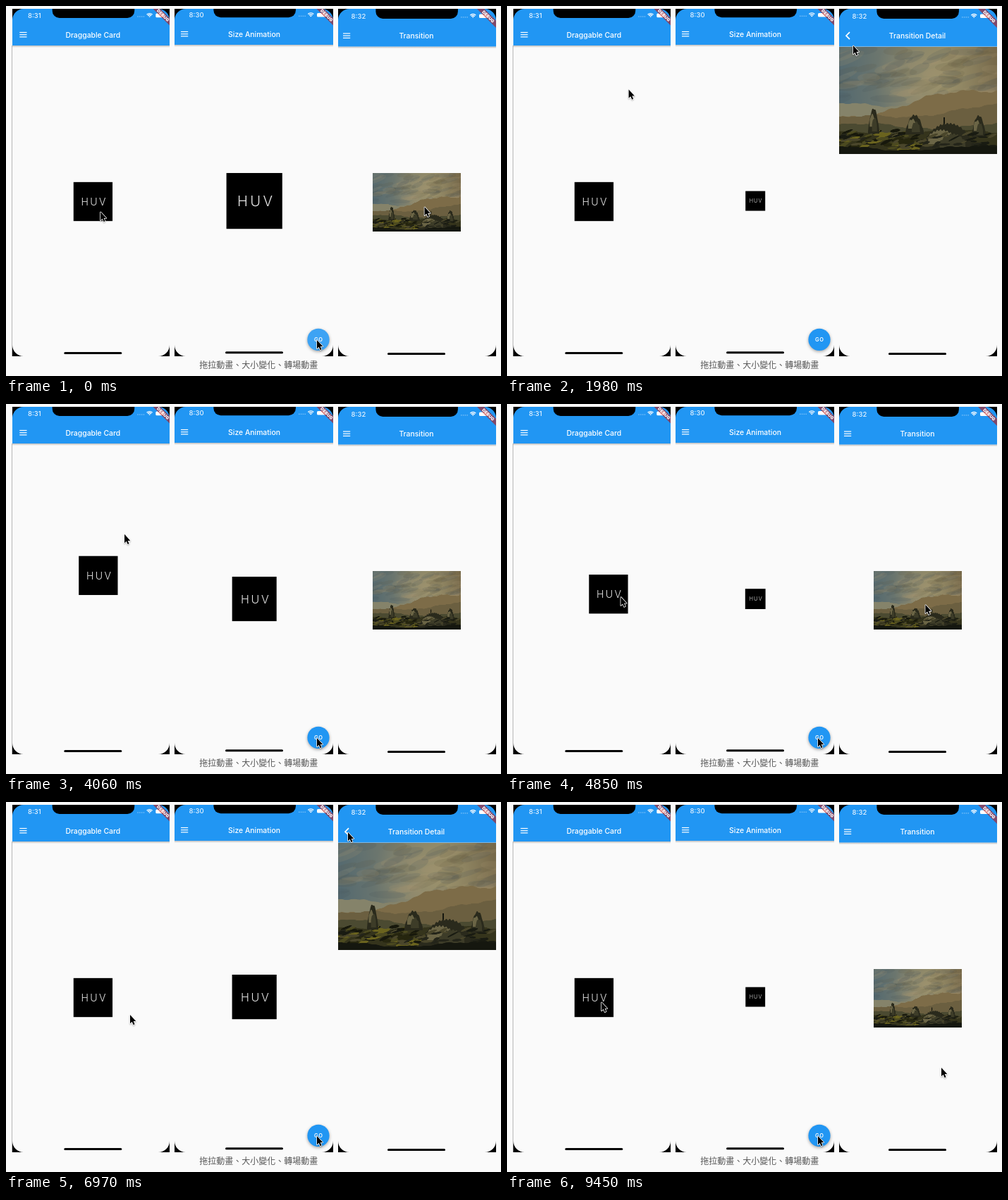
An HTML page with a canvas for the animation above (9550 ms loop, 702 by 525 pixels).

```html
<!DOCTYPE html>
<html lang="zh-Hant">
<head>
<meta charset="utf-8">
<style>
html, body { margin: 0; overflow: hidden; background: #fafafa; }
canvas { display: block; }
</style>
</head>
<body>
<canvas id="stage" width="702" height="525"></canvas>
<script>
const LOOP = 9550, TOP = 4, BOTTOM = 497;
const GLIDE = 560, HOLD = 60, RETURN = 450, ROUTE = 400;
const BLUE = '#2196f3', PAPER = '#fafafa', SANS = 'Inter, Roboto, sans-serif';
const painting = paintLandscape();
const ctx = document.getElementById('stage').getContext('2d');

const phones = [
  { left: 9, right: 232, cx: 123.3, dy: 0, bar: 56, time: '8:31', banner: 13, screen: dragScreen },
  { left: 239, right: 464, cx: 352, dy: -.7, bar: 55, time: '8:30', banner: 13, screen: sizeScreen },
  { left: 471, right: 695, cx: 582, dy: .9, bar: 57.5, time: '8:32', banner: 15.5, screen: heroScreen }
];

const drags = [
  { at: 550, grab: [134, 292], pull: [61, -182] },
  { at: 3190, grab: [145, 292], pull: [24, -110] },
  { at: 4565, grab: [134, 284], pull: [53, -20] },
  { at: 7600, grab: [134, 284], pull: [50, 90] }
];
const button = [441, 474], picture = [593.5, 285], backArrow = [485, 43];
const taps = [-140, 450, 2838, 4250, 6000, 7200, 8000, 8450];
const routes = [350, 2470, 5380, 7100];

// Each move is [start time, [x, y]]
const dragMoves = [
  ...drags.flatMap(({ at, grab, pull }) => [[at - GLIDE, grab], [at, [grab[0] + pull[0], grab[1] + pull[1]]]]),
  [1900, [-200, 260]], [5700, [176, 302]], [8750, [134, 284]]
].sort((a, b) => a[0] - b[0]);
const sizeMoves = [[0, button], [600, [480, 500]], [2000, button]];
const heroMoves = [[0, picture], [1500, backArrow], [2950, [430, 60]], [4300, picture], [6000, backArrow], [8000, [616, 377]]];

function mix(a, b, k) { return a + (b - a) * k; }
function clamp(v) { return Math.max(0, Math.min(1, v)); }
function smooth(v) { const u = clamp(v); return u * u * (3 - 2 * u); }

function pointerAt(moves, t) {
  const i = Math.max(0, moves.filter(m => m[0] <= t).length - 1);
  const from = moves[Math.max(0, i - 1)][1], [start, to] = moves[i];
  const k = smooth((t - start) / GLIDE);
  return [mix(from[0], to[0], k), mix(from[1], to[1], k)];
}

function paintLandscape() {
  const canvas = document.createElement('canvas');
  canvas.width = 448;
  canvas.height = 304;
  const g = canvas.getContext('2d');
  g.scale(2, 2);
  let seed = 7;
  const random = (a, b) => mix(a, b, (seed = seed * 16807 % 2147483647) / 2147483647);

  const fade = (gradient, ...colors) => {
    colors.forEach((c, i) => gradient.addColorStop(i / (colors.length - 1), c));
    g.fillStyle = gradient;
    g.fillRect(0, 0, 224, 152);
  };
  const silhouette = (color, from, to, top, base) => {
    g.fillStyle = color;
    g.beginPath();
    g.moveTo(from, base);
    for (let x = from; x <= to; x++) g.lineTo(x, top(x));
    g.lineTo(to, base);
    g.fill();
  };
  const ridge = (color, y, slope, height, phase) => silhouette(color, 0, 224, x =>
    y + slope * x - height * (Math.sin(x / 31 + phase) + .3 * Math.sin(x / 9 + phase * 2) + .12 * Math.sin(x / 2.7)), 152);
  const dapple = (count, colors, top, bottom, size, right = 224) => {
    for (let i = 0; i < count; i++) {
      g.fillStyle = colors[i % colors.length];
      g.beginPath();
      g.ellipse(random(0, right), random(top, bottom), random(size / 2, size), random(size / 8, size / 4), random(-.5, .1), 0, 7);
      g.fill();
    }
  };
  const rock = (x, base, half, height) => {
    const dome = (shift, scale) => v => base - height * scale * Math.max(0, 1 - Math.abs((v - x - shift) / half / scale) ** 2.2)
      + 1.2 * Math.sin(v * 1.3);
    silhouette('#2a2a1c', x - half, x + half, dome(0, 1), base + 3);
    silhouette('#6b6546', x - half * .7, x + half * .2, dome(-half * .25, .75), base - height * .2);
    silhouette('#3d3c28', x - half * .3, x + half * .6, dome(half * .15, .6), base);
  };

  fade(g.createLinearGradient(0, 30, 224, 10), '#556a70', '#737a6e', '#8b8564', '#77694a');
  fade(g.createRadialGradient(135, 48, 5, 135, 48, 85), 'rgba(165,152,112,.65)', 'rgba(165,152,112,0)');
  dapple(90, ['rgba(70,85,88,.16)', 'rgba(165,150,110,.16)', 'rgba(90,80,55,.13)'], 0, 75, 26);
  ridge('#85836a', 83, -.03, 4, 2);
  ridge('#7d6c48', 100, -.19, 6, 3.2);
  ridge('#6b5f40', 104, -.08, 4, 1);
  ridge('#4b4a31', 113, 0, 4, .4);
  ridge('#35341c', 121, 0, 3, 2.5);
  dapple(70, ['#6b641f', '#26260f', '#4c4a20', '#17180c'], 119, 145, 11, 130);
  rock(49, 120, 8, 32);
  rock(107, 121, 13, 24);
  rock(198, 125, 10, 27);
  rock(155, 146, 41, 37);
  dapple(45, ['#24251a', '#4a462b', '#191b12'], 123, 144, 9);
  ridge('#15170f', 144, 0, 3, 1.7);
  g.fillRect(148, 100, 2, 9);
  return canvas;
}

function rect(x, y, w, h, color) {
  ctx.fillStyle = color;
  ctx.fillRect(x, y, w, h);
}

function pill(x, y, w, h, radius, color) {
  ctx.fillStyle = color;
  ctx.beginPath();
  ctx.roundRect(x, y, w, h, radius);
  ctx.fill();
}

function circle(x, y, r, color) {
  ctx.fillStyle = color;
  ctx.beginPath();
  ctx.arc(x, y, r, 0, 7);
  ctx.fill();
}

function line(width, ...points) {
  ctx.lineWidth = width;
  ctx.strokeStyle = '#fff';
  ctx.beginPath();
  for (let i = 0; i < points.length; i += 2) ctx.lineTo(points[i], points[i + 1]);
  ctx.stroke();
}

function text(str, x, y, font, color = '#fff', align = 'center', spacing = 0) {
  ctx.font = font;
  ctx.fillStyle = color;
  ctx.textAlign = align;
  ctx.letterSpacing = spacing + 'px';
  ctx.fillText(str, x + (align === 'center' ? spacing / 2 : 0), y);
}

function linear(x0, y0, x1, y1, from, to) {
  const g = ctx.createLinearGradient(x0, y0, x1, y1);
  g.addColorStop(0, from);
  g.addColorStop(1, to);
  return g;
}

function shadow(blur, y, color) {
  ctx.shadowBlur = blur;
  ctx.shadowOffsetY = y;
  ctx.shadowColor = color;
}

function cursor([x, y]) {
  ctx.save();
  ctx.translate(x, y);
  ctx.scale(.9, .95);
  ctx.lineJoin = 'round';
  shadow(2, 1, 'rgba(0,0,0,.3)');
  line(1.7, 0, 0, 0, 13, 3, 10.3, 5.2, 15, 7.3, 14, 5.2, 9.5, 9.2, 9.5, 0, 0);
  shadow(0, 0, 'transparent');
  ctx.fillStyle = '#000';
  ctx.fill();
  ctx.restore();
}

function card(cx, cy, size) {
  rect(cx - size / 2, cy - size / 2, size, size, '#000');
  text('HUV', cx + size * .01, cy + size * .095, `300 ${size * .255}px ${SANS}`, '#e4e4e4', 'center', size * .042);
}

function page(p, title, offset = 0, detail = false) {
  const width = p.right - p.left, y = p.bar - 15.3;
  ctx.save();
  ctx.translate(offset, 0);
  if (detail && offset > 0) rect(p.left - 7, TOP, 7, 500, linear(p.left - 7, 0, p.left, 0, 'rgba(0,0,0,.04)', 'rgba(0,0,0,.2)'));
  rect(p.left, TOP, width, BOTTOM - TOP, PAPER);
  rect(p.left, p.bar, width, 3, linear(0, p.bar, 0, p.bar + 3, 'rgba(0,0,0,.25)', 'rgba(0,0,0,0)'));
  rect(p.left, TOP, width, p.bar - TOP, BLUE);
  text(title, p.cx, y + 3.8, `500 10.4px ${SANS}`);
  if (detail) line(1.7, p.cx - 96, y - 5, p.cx - 101, y, p.cx - 96, y + 5);
  else for (const d of [-3.2, 0, 3.2]) line(1.2, p.cx - 104, y + d, p.cx - 93.8, y + d);
  ctx.restore();
}

function dragScreen(p, t) {
  page(p, 'Draggable Card');
  let x = 123.4, y = 277.5;
  for (const { at, pull } of drags) {
    const age = t - at;
    const k = .75 * smooth(age / GLIDE) * (1 - smooth((age - GLIDE - HOLD) / RETURN));
    x += pull[0] * k;
    y += pull[1] * k;
  }
  card(x, y, 55.3);
  return dragMoves;
}

function sizeScreen(p, t) {
  page(p, 'Size Animation');
  const i = taps.filter(tap => tap <= t).length - 1;
  const [from, to] = i % 2 ? [63, 28] : [28, 63];
  const u = (t - taps[i]) / 700;
  card(352.2, 276.6, mix(from, to, 1 - 2 ** (-5.5 * u) * Math.cos(u * Math.PI * 5)));

  ctx.save();
  shadow(4, 1.5, 'rgba(0,0,0,.35)');
  circle(443, 473.4, 15.6, BLUE);
  ctx.restore();
  for (const tap of taps) {
    const age = t - tap + 90;
    if (age >= 0 && age < 500) circle(443, 473.4, mix(8, 15.6, clamp(age / 210)), `rgba(255,255,255,${.24 * (1 - age / 500)})`);
  }
  text('GO', 443, 476, `600 7.4px ${SANS}`, '#fff', 'center', .7);
  return sizeMoves;
}

function heroScreen(p, t) {
  const count = routes.filter(r => r <= t).length;
  const u = count ? clamp((t - routes[count - 1]) / ROUTE) : 1;
  const toward = k => count % 2 ? k : 1 - k;
  const slide = toward(1 - (1 - u) ** 3), rise = toward(u * (3 - 2 * Math.sqrt(u)));
  const spread = 1 - (1 - rise) ** 2;
  const width = p.right - p.left;

  page(p, 'Transition', -slide * width / 3);
  if (slide > 0) page(p, 'Transition Detail', (1 - slide) * width, true);
  ctx.drawImage(painting, mix(519.5, p.left, spread), mix(236.7, p.bar, rise), mix(125.3, width, spread), mix(83.3, 152.3, spread));
  return heroMoves;
}

function statusBar({ cx, dy, time }) {
  const y = 13.2 + dy;
  pill(cx - 57.6, 0, 116.5, 17 + dy, [0, 0, 10, 10], '#000');
  text(time, cx - 92.4, y + 3.5, `500 9.5px ${SANS}`, '#e6f3fe', 'left');
  for (let i = 0; i < 4; i++) rect(cx + 63 + i * 2.8, y + 1.2, 1.5, 1.2, 'rgba(255,255,255,.45)');
  ctx.lineWidth = 1.4;
  ctx.strokeStyle = '#fff';
  for (const r of [1.2, 3.4, 5.6]) {
    ctx.beginPath();
    ctx.arc(cx + 80.3, y + 3, r, -2.36, -.78);
    ctx.stroke();
  }
  pill(cx + 89, y - 2.6, 12.5, 5.6, 1.5, '#fff');
}

function frameEdge({ left, right, cx, dy }) {
  const box = [left, TOP, right - left, BOTTOM - TOP];
  ctx.fillStyle = '#000';
  ctx.beginPath();
  ctx.rect(...box);
  ctx.roundRect(...box, 16);
  ctx.fill('evenodd');
  pill(cx - 41, 491 + dy, 82, 3, 1.5, '#000');
}

function debugBanner({ right, banner }) {
  ctx.save();
  ctx.translate(right, TOP);
  ctx.rotate(Math.PI / 4);
  rect(-30, banner - 3.6, 60, 7.2, 'rgba(183,28,28,.63)');
  text('DEBUG', 0, banner + 2.2, `900 6.1px ${SANS}`, '#fff', 'center', .1);
  ctx.restore();
}

function draw(now) {
  const t = now % LOOP;
  rect(0, 0, 702, 525, PAPER);
  for (const p of phones) {
    ctx.save();
    ctx.beginPath();
    ctx.rect(p.left, TOP, p.right - p.left, BOTTOM - TOP);
    ctx.clip();
    const moves = p.screen(p, t);
    statusBar(p);
    frameEdge(p);
    debugBanner(p);
    cursor(pointerAt(moves, t));
    ctx.restore();
  }
  rect(8, 56, 1, BOTTOM - 56, '#b8b8b8');
  text('拖拉動畫、大小變化、轉場動畫', 358.3, 514, '12px "Noto Sans CJK TC", "Noto Sans CJK", sans-serif', '#555');
  requestAnimationFrame(draw);
}
requestAnimationFrame(draw);
</script>
</body>
</html>
```
